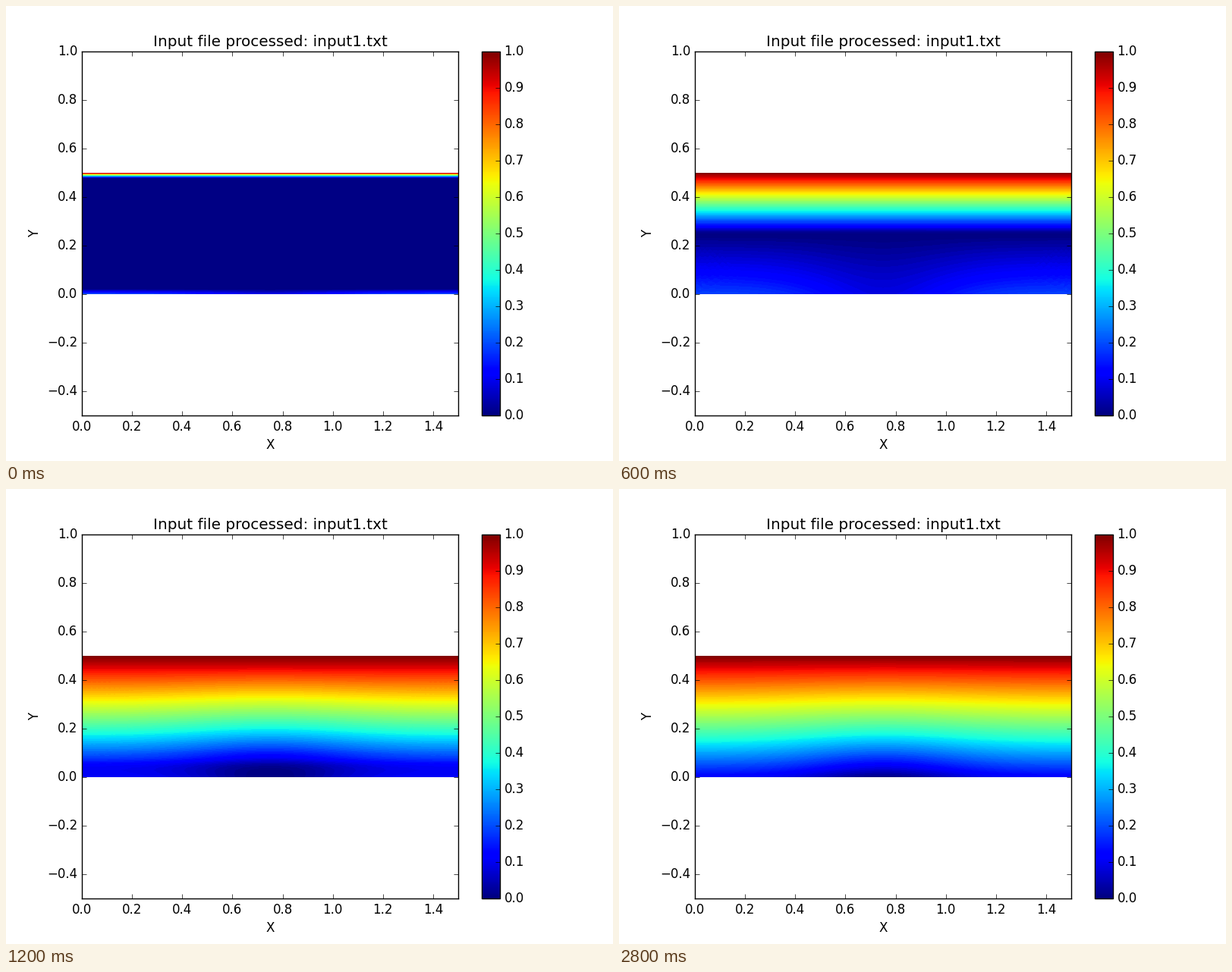
Animation, 800 px wide and 600 px high, one loop 3 s. Source, as a matplotlib script:

```python
import numpy as np
import matplotlib.pyplot as plt
from matplotlib.animation import FuncAnimation
from matplotlib.cm import ScalarMappable
from matplotlib.colors import Normalize

plt.style.use("classic")
plt.rcParams.update({"font.family": "DejaVu Sans", "figure.facecolor": "white"})

LENGTH, WIDTH, STEP = 1.5, 0.5, 0.01
COLD, HOT = 10.0, 100.0
FRAMES, INTERVAL = 15, 200
NX, NY = round(LENGTH / STEP), round(WIDTH / STEP)

x = np.linspace(0, LENGTH, NX + 1)
y = np.linspace(0, WIDTH, NY + 1)
bottom = COLD * (2 - np.exp(-10 * (x[:-1] - LENGTH / 2) ** 2))
top = np.full(NX, HOT)


def laplace(u):
    """Five-point operator, periodic in x, zero outside in y."""
    out = 4 * u - np.roll(u, 1, axis=1) - np.roll(u, -1, axis=1)
    out[1:] -= u[:-1]
    out[:-1] -= u[1:]
    return out


def with_walls(u):
    """Add both walls and the wrapped column, then scale to 0..1."""
    full = np.vstack([bottom, u, top])
    full = np.hstack([full, full[:, :1]])
    return (full - full.min()) / (full.max() - full.min())


def solve():
    """Conjugate gradients: keep step 1, then every tenth step."""
    rhs = np.zeros((NY - 1, NX))
    rhs[0], rhs[-1] = bottom, top
    u = np.ones_like(rhs)
    r = rhs - laplace(u)
    p = r.copy()
    rr = np.sum(r * r)
    states = []
    for n in range(1, 10 * (FRAMES - 1) + 1):
        if rr > 1e-16:
            ap = laplace(p)
            alpha = rr / np.sum(p * ap)
            u = u + alpha * p
            r = r - alpha * ap
            rr_next = np.sum(r * r)
            p = r + rr_next / rr * p
            rr = rr_next
        if n == 1 or n % 10 == 0:
            states.append(with_walls(u))
    return states


states = solve()
levels = np.linspace(0, 1, 101)
norm = Normalize(0, 1)

fig, ax = plt.subplots(figsize=(8, 6), dpi=100)
bar = fig.colorbar(ScalarMappable(norm, "jet"), ax=ax)
bar.set_ticks(np.arange(11) / 10)
ax.set_xlim(0, 1.5)
ax.set_ylim(-0.5, 1)
ax.set_xticks(np.arange(8) / 5)
ax.set_yticks(np.arange(-2, 6) / 5)
ax.set_xlabel("X")
ax.set_ylabel("Y")
ax.set_title("Input file processed: input1.txt")

shown = []


def draw(i):
    while shown:
        shown.pop().remove()
    field = ax.contourf(x, y, states[i], levels, cmap="jet", norm=norm)
    shown.append(field)
    return shown


anim = FuncAnimation(fig, draw, frames=FRAMES, init_func=lambda: draw(0),
                     interval=INTERVAL, repeat=True, repeat_delay=0, blit=False)
plt.show()
```
